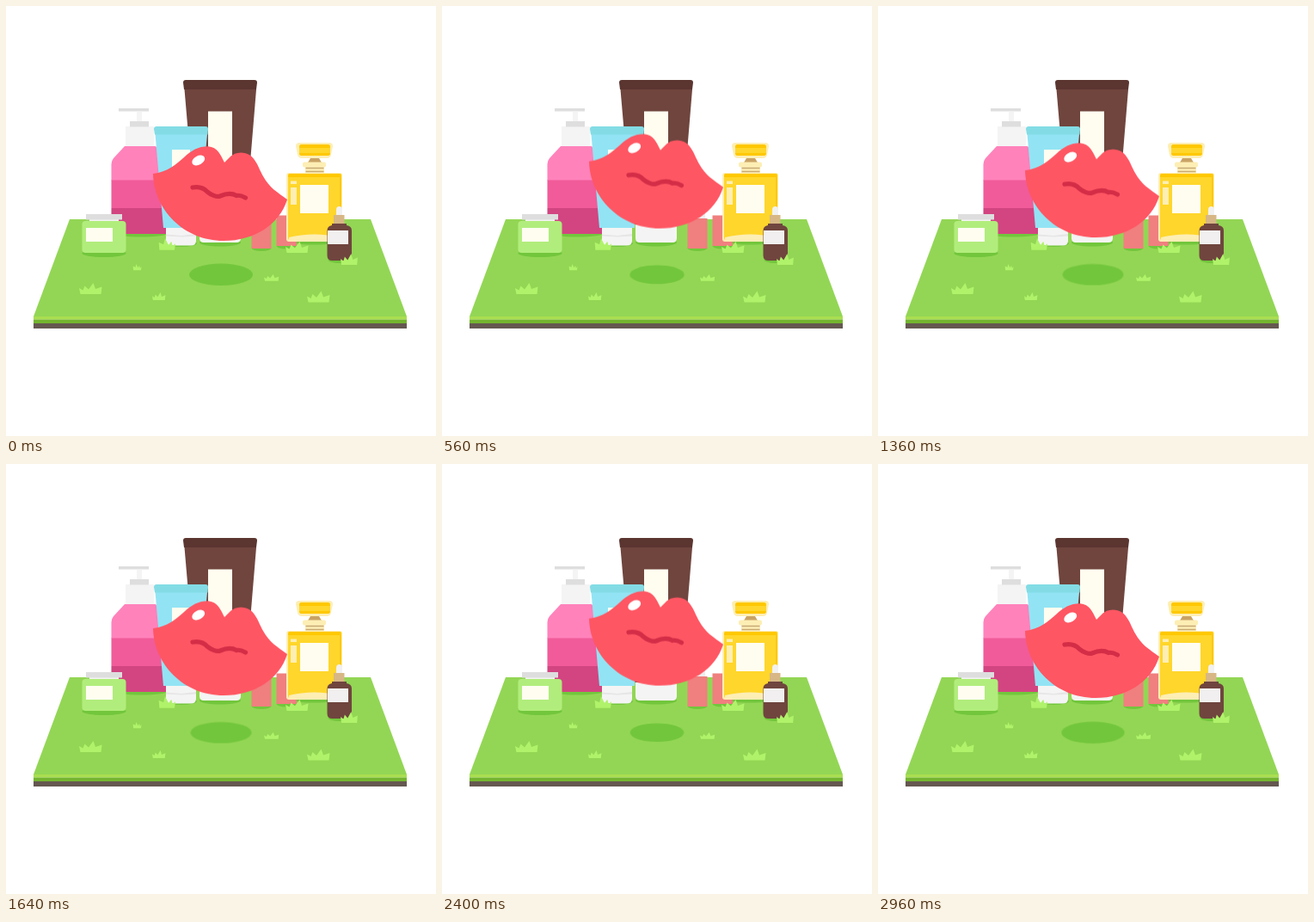
Recreate the animation shown at these times as an HTML page without scripts. Size 500 px wide and 500 px high, loop 3 s.

```html
<!DOCTYPE html>
<html lang="en">
<head>
<meta charset="utf-8">
<title>Floating lips</title>
<style>
html, body { margin: 0; width: 100%; height: 100%; overflow: hidden; background: #fff; }
svg { display: block; width: 100vw; height: 100vh; }
.lips { animation: float 3s linear infinite; }
.shade { transform-origin: 250px 312.3px; animation: shrink 3s linear infinite; }
@keyframes float {
  0%, 50%, 100% { transform: translateY(0); }
  26%, 74% { transform: translateY(-20px); }
}
@keyframes shrink {
  0%, 50%, 100% { transform: scale(1); }
  26%, 74% { transform: scale(.8); }
}
.ground { fill: #72c63c; }
.cream { fill: #fffdf0; }
.white { fill: #f4f4f4; }
.grey { fill: #dedede; }
.pale { fill: #fdeeb4; }
.gold { fill: #ffd62b; }
.amber { fill: #fec800; }
.coral { fill: #f07f7f; }
.cocoa { fill: #6f453e; }
</style>
</head>
<body>
<svg viewBox="0 0 500 500">
  <defs>
    <path id="tuft" fill="#b0f36a" d="M1.5 13L0 6L4.5 8.5L6.5 3.5L11 7.5L16.5 0L19 7L26.5 4.5L25.5 13Z"/>
  </defs>

  <!-- lawn -->
  <path fill="#93d655" d="M74 248H424L466 361H32Z"/>
  <path fill="#a9de50" d="M32 361H466V364.5H32Z"/>
  <path fill="#74b52f" d="M32 364.5H466V369H32Z"/>
  <path fill="#655850" d="M32 369H466V375H32Z"/>

  <!-- contact shadows -->
  <g class="ground">
    <ellipse cx="157" cy="264.500" rx="31" ry="4"/>
    <ellipse cx="114" cy="287.500" rx="25.500" ry="4.500"/>
    <ellipse cx="204" cy="276" rx="18" ry="4"/>
    <ellipse cx="249" cy="275" rx="24" ry="4.500"/>
    <ellipse cx="297" cy="281.500" rx="11.500" ry="3.500"/>
    <ellipse cx="326" cy="279" rx="11.500" ry="3.500"/>
    <ellipse cx="358" cy="273.500" rx="31" ry="4"/>
    <ellipse cx="388" cy="295" rx="13.500" ry="4"/>
  </g>
  <ellipse class="ground shade" cx="250" cy="312.300" rx="37" ry="12.800"/>

  <!-- brown tube -->
  <path class="white" d="M225 245H273V270Q273 275 268 275H230Q225 275 225 270Z"/>
  <path class="cocoa" d="M207.500 97H291L278 254H221Z"/>
  <path fill="#5b3530" d="M206 89Q206 86 209 86H289Q292 86 292 89L291 97H207Z"/>
  <path class="cream" d="M235 122.500H263V200H235Z"/>

  <!-- pump bottle -->
  <path class="grey" d="M131 119H166V122.500H131Z"/>
  <path class="white" d="M152 122.500H158V134H152ZM139 140H172V163H139Z"/>
  <path class="grey" d="M144 134H166V140.500H144Z"/>
  <path fill="#ff82bb" d="M138 163H174L190 183V203H122.500V184Q122.500 180 125 177Z"/>
  <path fill="#f15b99" d="M122.500 202.500H190V235H122.500Z"/>
  <path fill="#d24581" d="M122.500 235H190V265H126.500Q122.500 265 122.500 261Z"/>

  <!-- blue tube -->
  <path class="white" d="M186 256H221V273Q221 278.500 215 278.500H192Q186 278.500 186 273Z"/>
  <path fill="#e7e5e5" d="M186 265.500L204 267L221 265V267.500L204 268.500L186 267.500Z"/>
  <path fill="#92e4f4" d="M173.500 149H234L224 258H183Z"/>
  <path fill="#83dce5" d="M172 143Q172 140 175 140H232Q235 140 235 143L234.500 149.500H173Z"/>
  <path class="cream" d="M193 167H214V225H193Z"/>

  <!-- jar -->
  <path class="white" d="M97 247H131V251H97Z"/>
  <path class="grey" d="M93 242H135V248.500H93Z"/>
  <rect x="88.500" y="250" width="51" height="37" rx="4" fill="#b1ed7c"/>
  <path class="cream" d="M93 258H124V274H93Z"/>

  <!-- lipsticks -->
  <path fill="#ededed" d="M292 236H306V248H292Z"/>
  <path class="coral" d="M285.500 247H308.500V282H285.500ZM314.500 243.500H338V279H314.500Z"/>

  <!-- perfume -->
  <path class="pale" d="M341 159H376Q380 159 380 163L378 173Q377 177 373 177H344Q340 177 339 173L337 163Q337 159 341 159Z"/>
  <rect x="341" y="161" width="36" height="13" rx="3" class="gold"/>
  <path class="amber" d="M341 164Q341 161 344 161H374Q377 161 377 164V165H341ZM341 171H377Q377 174 374 174H344Q341 174 341 171Z"/>
  <path fill="#c9a365" d="M354 177H364L367 182H351Z"/>
  <rect x="345" y="181.500" width="27" height="6" rx="2" class="pale"/>
  <path class="pale" d="M348 187H370V195H348Z"/>
  <path stroke="#c8aa75" stroke-width="1.500" d="M348.500 188.500H369.500M348.500 192.500H369.500"/>
  <rect x="326" y="194" width="65" height="80" rx="3" class="pale"/>
  <rect x="328" y="195" width="62" height="77" rx="2" class="gold"/>
  <path class="amber" d="M328 197Q328 195 330 195H388Q390 195 390 197V260L388 263V199H328Z"/>
  <path class="cream" d="M342 208H375V241H342Z"/>
  <path class="pale" d="M331 203.500H338V207H331ZM331 211H338V231H331ZM329 269Q358 262 389 269V272H329Z"/>

  <!-- dropper -->
  <path fill="#f1f1f1" d="M384 246V237Q384 233 387.500 233T391 237V246Z"/>
  <path fill="#d7b785" d="M381 243H393.500V254H381Z"/>
  <path class="cocoa" d="M379 253H396V255Q402 256 402 261V290Q402 296 396 296H379.500Q373.500 296 373.500 290V261Q373.500 256 379 255Z"/>
  <path fill="#f1efef" d="M374 261H398V277H374Z"/>

  <!-- grass -->
  <use href="#tuft" transform="translate(85 322)"/>
  <use href="#tuft" transform="translate(350 331.500)"/>
  <use href="#tuft" transform="translate(325 274)"/>
  <use href="#tuft" transform="translate(197 270) scale(-.73 1.050)"/>
  <use href="#tuft" transform="translate(389 288) scale(.75 1)"/>
  <use href="#tuft" transform="translate(170 333) scale(.58 .7)"/>
  <use href="#tuft" transform="translate(300 312) scale(.65 .6)"/>
  <use href="#tuft" transform="translate(157.500 300) scale(-.37 .55)"/>

  <g class="lips">
    <path fill="#ff5663" d="M171 195C188 193 198 184 207 176C216 168 223 163.300 235 163.300C246 164 250 174 254 182C259 178 262 170.800 273 170.500C289 170.500 292 185 299 198C306 211 316 217 327 225C318 254 289 273 253 273C207 273 172 237 171 195Z"/>
    <path fill="none" stroke="#d32d47" stroke-width="5.200" stroke-linecap="round" d="M217 211C225 209.500 230 211.500 234 216C238 219.500 245 222.500 249 221C256 218 262 217 268 220.500Q272 219.500 278.500 223"/>
    <ellipse cx="223.700" cy="179.500" rx="8" ry="5.200" fill="#fff" transform="rotate(-28 223.700 179.500)"/>
  </g>
</svg>
</body>
</html>
```
